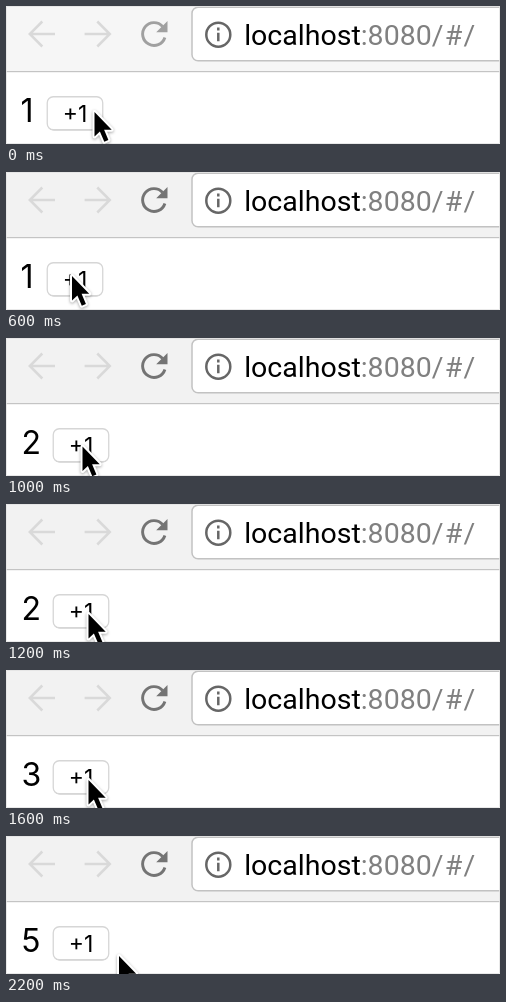
Recreate the animation shown at these times as an HTML page. Size 494 by 138 pixels, loop 2300 ms.

```html
<!DOCTYPE html>
<html lang="en">
<head>
<meta charset="utf-8">
<title>Counter</title>
<style>
  html, body { margin: 0; width: 100%; height: 100%; overflow: hidden; background: #fff; }
  svg { display: block; width: 494px; height: 138px; }
  .url { font: 28.5px Roboto, sans-serif; }
  .page {
    font-family: Inter, sans-serif;
    font-optical-sizing: none;
    font-variation-settings: "opsz" 14;
    fill: #000;
  }
  #cursor { filter: drop-shadow(0 1.5px 1.5px rgba(0, 0, 0, .35)); }
</style>
</head>
<body>
<svg viewBox="0 0 494 138">
  <rect width="494" height="138" fill="#fff"/>
  <rect id="bar" width="494" height="65"/>
  <rect y="65" width="494" height="1.2" fill="#c4c4c4"/>

  <g fill="none" stroke="#d9d9d9" stroke-width="2.5">
    <path id="arrow" d="M49 28H24M36.300 15.500L23.800 28L36.300 40.500"/>
    <use href="#arrow" transform="translate(127.6 0) scale(-1 1)"/>
  </g>
  <g id="reload">
    <path d="M158.900 31.500A11.400 11.400 0 1 1 156.600 20.500" fill="none" stroke="currentColor" stroke-width="2.9"/>
    <path d="M161.500 15V26.300H150.200z" fill="currentColor"/>
  </g>

  <rect x="186" y="1.3" width="330" height="53.5" rx="6" fill="#fff" stroke="#c2c2c2" stroke-width="1.5"/>
  <g fill="none" stroke="#666" stroke-width="2.5">
    <circle cx="212.3" cy="28.7" r="12"/>
    <path d="M212.3 26.8v8.4M212.3 21.6v2.8"/>
  </g>
  <text class="url" x="238.2" y="39.3">localhost<tspan fill="#808080">:8080<tspan letter-spacing="1.3">/#/</tspan></tspan></text>

  <text id="count" class="page" y="116" font-size="32"></text>
  <g id="button">
    <rect x="1" y="91.6" width="55" height="33" rx="6" fill="#cacaca"/>
    <rect x=".75" y="90.75" width="55.5" height="33" rx="6" fill="#fff" stroke="#d6d6d6" stroke-width="1.3"/>
    <text class="page" x="28.5" y="116" font-size="23" text-anchor="middle">+1</text>
  </g>

  <path d="M.5 .5H493.500V137.500H.5z" fill="none" stroke="#e4e4e4" stroke-opacity=".8"/>
  <path id="cursor" d="M0 0V24.500L5.400 19.400L9.800 29.700L13.900 27.900L9.600 17.700H17.200z"
    fill="#000" stroke="#fff" stroke-width="4" stroke-linejoin="round" paint-order="stroke"/>
</svg>
<script>
const LOOP = 2300, STEP = 100;
// time, x, y of the pointer tip
const path = [
  [0, 88.5, 106], [500, 67, 104], [600, 66, 104], [800, 70.5, 107],
  [1200, 82.5, 110], [2100, 82.5, 110], [2200, 113, 120]
];
const clicks = [700, 1300, 1700, 2000];
const el = id => document.getElementById(id);
const [bar, reload, count, button, cursor] =
  ["bar", "reload", "count", "button", "cursor"].map(el);

function tipAt(t) {
  const i = path.findIndex(p => p[0] > t);
  if (i < 0) return path[path.length - 1].slice(1);
  const [t0, x0, y0] = path[i - 1], [t1, x1, y1] = path[i];
  const k = (t - t0) / (t1 - t0), e = k * k * (3 - 2 * k);
  return [x0 + (x1 - x0) * e, y0 + (y1 - y0) * e];
}

function draw(t) {
  const n = 1 + clicks.filter(c => c <= t).length;
  const pale = t < STEP;
  count.textContent = n;
  count.setAttribute("x", n === 1 ? 14.5 : 15.5);
  button.setAttribute("transform", `translate(${n === 1 ? 40.5 : 46.5} 0)`);
  cursor.setAttribute("transform", `translate(${tipAt(t)})`);
  bar.setAttribute("fill", pale ? "#f6f6f6" : "#f2f2f2");
  reload.setAttribute("color", pale ? "#a0a0a0" : "#747474");
}

const start = performance.now();
function tick() {
  const t = Math.max(0, performance.now() - start) % LOOP;
  draw(Math.floor(t / STEP) * STEP);
  requestAnimationFrame(tick);
}
draw(0);
requestAnimationFrame(tick);
</script>
</body>
</html>
```
